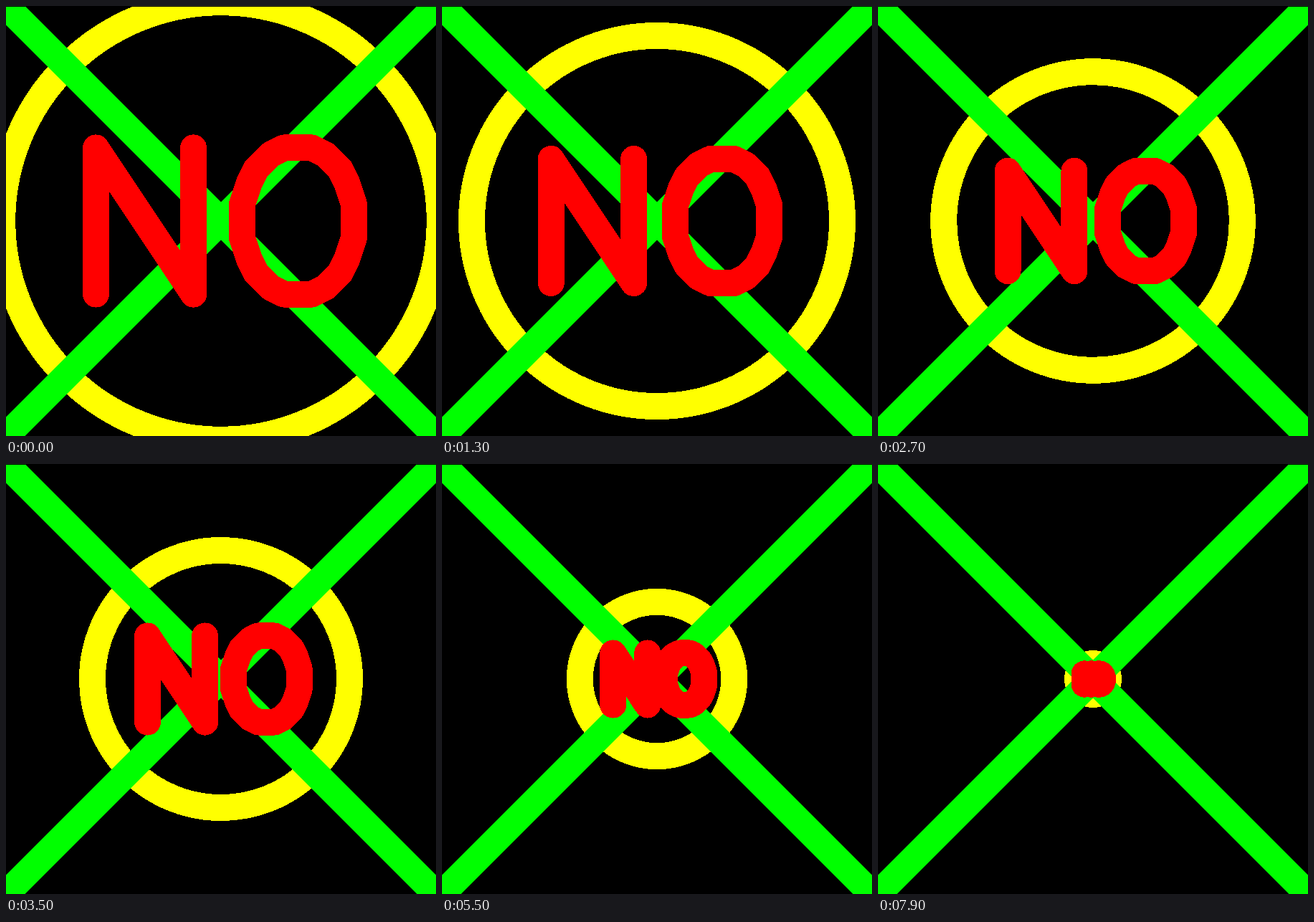
Write an HTML page that moves like this. It is 600x600 px and loops after 8000 ms.

```html
<!DOCTYPE html>
<html lang="en">
<head>
<meta charset="utf-8">
<title>NO</title>
<style>
  html, body { margin: 0; width: 100%; height: 100%; overflow: hidden; background: #000; }
  svg { display: block; width: 100vw; height: 100vh; }
  path, circle { fill: none; stroke-width: 37; vector-effect: non-scaling-stroke; }
</style>
</head>
<body>
<svg viewBox="0 0 600 600" shape-rendering="crispEdges" role="img" aria-label="NO">
  <circle id="ring" cx="300" cy="300" stroke="#ff0" />
  <path d="M-40-40 640 640M640-40-40 640" stroke="#0f0" style="stroke-width:37.8" />
  <!-- Single-stroke letters on a 44 by 21 grid, y pointing up -->
  <path id="word" stroke="#f00" stroke-linecap="round" stroke-linejoin="round"
    d="M4 0V21L18 0V21
       M31 21L29 20 27 18 26 16 25 13V8L26 5 27 3 29 1 31 0H35L37 1 39 3 40 5 41 8V13L40 16 39 18 37 20 35 21Z" />
  <rect width="600" height="1" />
</svg>
<script>
  const STEP = 100, STEPS = 80, START_SIZE = 85;
  const ring = document.getElementById('ring');
  const word = document.getElementById('word');

  function draw(time) {
    const size = START_SIZE - Math.floor(time / STEP) % STEPS;
    const unit = size * 0.1144;
    ring.setAttribute('r', size * 3.591);
    word.setAttribute('transform',
      `translate(300.5 300) scale(${unit} ${-unit}) translate(-22 -10.5)`);
  }

  const start = performance.now();
  function tick() {
    draw(performance.now() - start);
    requestAnimationFrame(tick);
  }
  tick();
</script>
</body>
</html>
```
